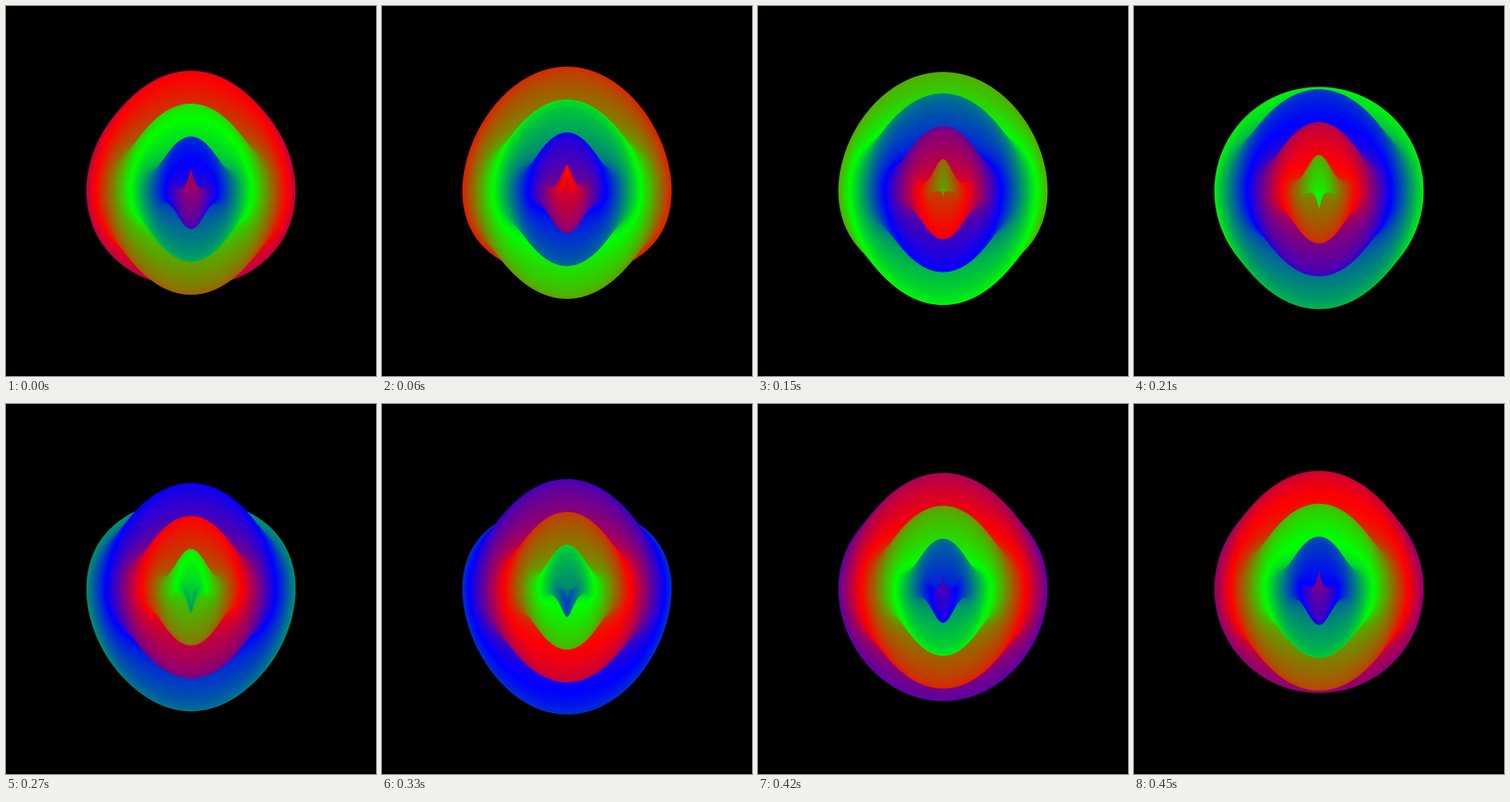
These frames come from a looping animation (500x500 px, 0.48 s). An HTML page with a canvas:

```html
<!DOCTYPE html>
<html lang="en">
<head>
<meta charset="utf-8">
<title>Colour ripple</title>
<style>
  html, body { margin: 0; height: 100%; overflow: hidden; background: #000; }
  canvas { display: block; width: 500px; height: 500px; }
</style>
</head>
<body>
<canvas id="stage" width="1000" height="1000"></canvas>
<script>
const ctx = document.getElementById('stage').getContext('2d');
const TAU = 2 * Math.PI;
const STEPS = 16, STEP_MS = 30;
const RADIUS = 100 * Math.SQRT2, SWING = RADIUS / 5;
const RINGS = 200, CORNERS = 120;

// Twice the stage size keeps the stacked edges crisp.
ctx.scale(2, 2);

// Linear red -> green -> blue -> red wheel; the channels always sum to 255.
function wheel(hue) {
  const h = (hue - Math.floor(hue)) * 3;
  const from = Math.floor(h) % 3;
  const rgb = [0, 0, 0];
  rgb[from] = Math.round(255 * (1 - h % 1));
  rgb[(from + 1) % 3] = 255 - rgb[from];
  return `rgb(${rgb})`;
}

// A circle whose top and bottom are both lifted while its sides stay put.
function ring(radius, lift) {
  ctx.beginPath();
  for (let i = 0; i < CORNERS; i++) {
    const angle = i / CORNERS * TAU, s = Math.sin(angle);
    ctx.lineTo(250 + radius * Math.cos(angle), 250 + radius * s + lift * s * s);
  }
  ctx.fill();
}

// Rings stacked from large to small, with a ripple running outwards.
function draw(turn) {
  ctx.fillStyle = '#000';
  ctx.fillRect(0, 0, 500, 500);
  for (let i = RINGS; i > 0; i--) {
    const size = i / RINGS;
    ctx.fillStyle = wheel(turn - size - 1 / 12);
    ring(RADIUS * size, SWING * Math.sin(20 * size - TAU * (turn + 0.25)));
  }
}

function tick() {
  draw(Math.floor(performance.now() / STEP_MS) % STEPS / STEPS);
  requestAnimationFrame(tick);
}
tick();
</script>
</body>
</html>
```
